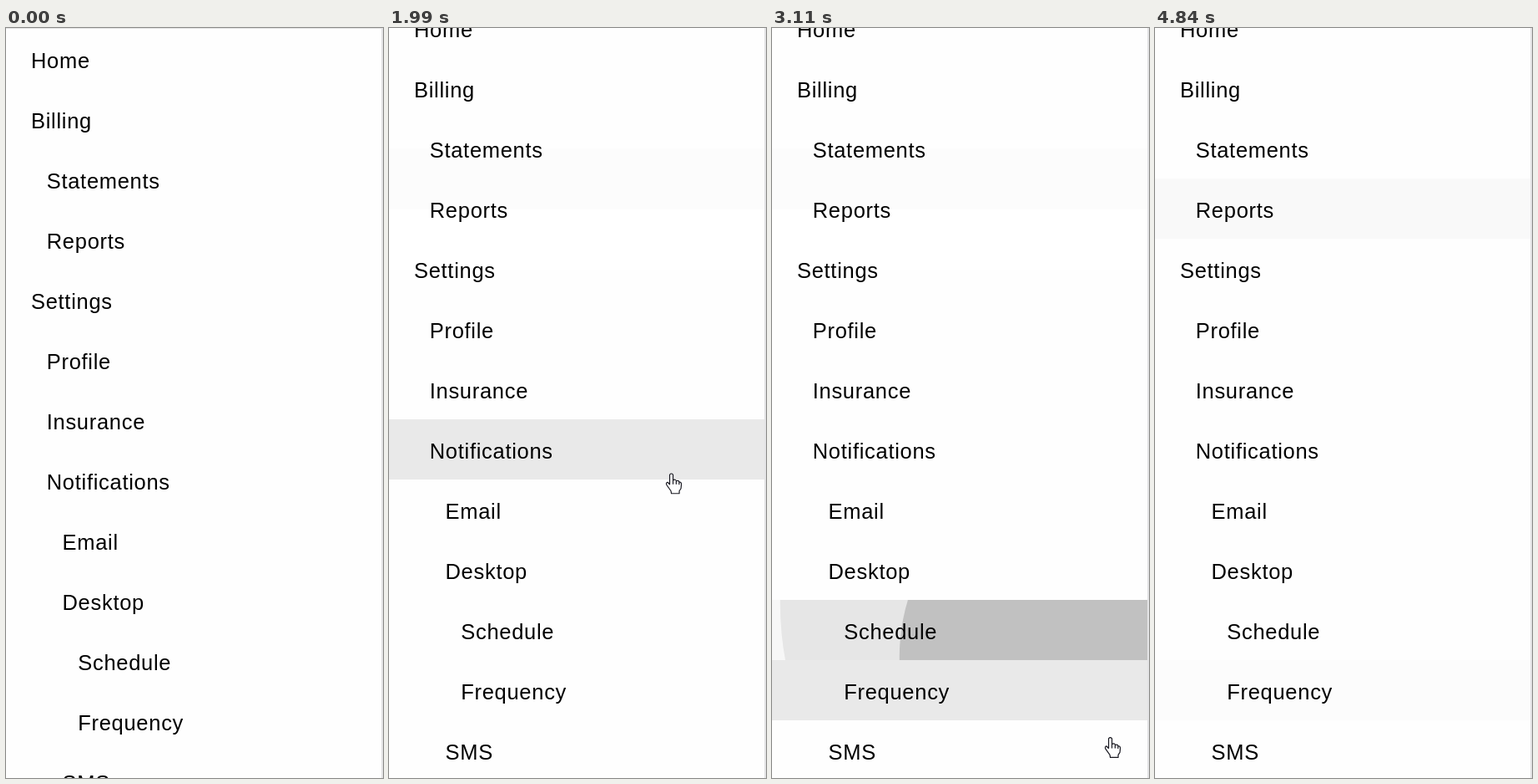
Animation of 452x897 px, one loop 4870 ms. Source, as an HTML page with a canvas:

```html
<!DOCTYPE html>
<html lang="en">
<head>
<meta charset="utf-8">
<title>Nested menu</title>
<style>
html, body { margin: 0; width: 100%; height: 100%; overflow: hidden; background: #fefefe; }
canvas { display: block; }
</style>
</head>
<body>
<canvas id="stage" width="452" height="897"></canvas>
<script>
const ctx = document.getElementById('stage').getContext('2d');
const LOOP = 4870, ROW = 72, MENU_W = 450;
const HOVER_LAG = 40, HOVER_FADE = 200, SETTLED = 3790;

// label, nesting depth
const items = [
  ['Home', 0], ['Billing', 0], ['Statements', 1], ['Reports', 1],
  ['Settings', 0], ['Profile', 1], ['Insurance', 1], ['Notifications', 1],
  ['Email', 2], ['Desktop', 2], ['Schedule', 3], ['Frequency', 3], ['SMS', 2]
];

// time, x, y of the pointer tip
const tracks = [
  [[150, 400, -20], [190, 398, 8], [400, 380, 130], [640, 372, 238], [690, 460, 245]],
  [[1490, 452, 470], [1640, 370, 505], [1990, 338, 532], [2550, 362, 676],
   [2780, 384, 690], [2930, 386, 751], [3110, 405, 848], [3290, 417, 840],
   [3340, 417, 821], [3670, 412, 98], [3720, 395, 58], [3760, 380, -30]]
];

const ripples = [
  { row: 10, x: 386, y: 688, start: 2780, size: 392 },
  { row: 10, x: 386, y: 752, start: 2990, size: 386 },
  { row: 12, x: 417, y: 840, start: 3298, size: 421 }
];
const presses = [[2740, 2800], [2890, 3000], [3240, 3310]];

const hand = new Path2D('M-2 13V1.5Q0-1 2 1.5V8Q5 6.5 6 9Q9 8 9.5 10.5Q12 10 12 13' +
  'L11.5 18L9.5 21V24H0L-.5 21L-5.5 14Q-7 11-4.5 10.5Z');
const knuckles = new Path2D('M2 8V13M5.8 9V13M9.3 10.5V13.5');

const clamp = v => Math.max(0, Math.min(1, v));

function pointer(t) {
  for (const track of tracks) {
    for (let i = 1; i < track.length; i++) {
      const [t0, x0, y0] = track[i - 1], [t1, x1, y1] = track[i];
      if (t >= t0 && t < t1) {
        const p = (t - t0) / (t1 - t0);
        return { x: x0 + (x1 - x0) * p, y: y0 + (y1 - y0) * p };
      }
    }
  }
  return null;
}

function scrollAt(t) {
  const p = clamp((t - 1490) / 260);
  return 37 * p * p * (3 - 2 * p);
}

function rowUnder(t) {
  const p = pointer(t);
  return p && p.x < MENU_W ? Math.floor((p.y + scrollAt(t) - 1) / ROW) : -1;
}

function hoverLevels(t) {
  const levels = {};
  for (let age = HOVER_FADE; age >= 0; age -= 5) {
    levels[rowUnder(t - HOVER_LAG - age)] = 1 - age / HOVER_FADE;
  }
  return levels;
}

// Fast start, long slow end: cubic-bezier(0, 0, .2, 1)
function decelerate(x) {
  let lo = 0, hi = 1;
  for (let i = 0; i < 20; i++) {
    const u = (lo + hi) / 2;
    if (0.6 * u * u + 0.4 * u * u * u < x) lo = u; else hi = u;
  }
  return lo * lo * (3 - 2 * lo);
}

function band(y, h, color) {
  ctx.fillStyle = color;
  ctx.fillRect(0, y, MENU_W, h);
}

function drawTints(t) {
  if (t >= SETTLED) {
    band(180, ROW, '#f9f9f9');
    band(756, ROW, '#fcfcfc');
  } else if (t >= 640) {
    band(144, 73, '#fcfcfc');
    band(217, ROW, t < 1490 ? '#fdfdfd' : '#fff');
  }
}

function drawRipple(r, t, scroll) {
  const age = t - r.start;
  if (age < 0 || age > 450) return;
  const alpha = 0.16 * clamp((430 - age) / 230);
  ctx.save();
  ctx.beginPath();
  ctx.rect(0, r.row * ROW + 1 - scroll, MENU_W, ROW);
  ctx.clip();
  ctx.fillStyle = `rgba(0,0,0,${alpha})`;
  ctx.beginPath();
  ctx.arc(r.x, r.y, r.size * decelerate(age / 450), 0, Math.PI * 2);
  ctx.fill();
  ctx.restore();
}

function drawPointer(t) {
  const p = pointer(t);
  if (!p) return;
  if (presses.some(([from, to]) => t >= from && t < to)) {
    ctx.fillStyle = 'rgba(246,240,30,.6)';
    ctx.beginPath();
    ctx.arc(p.x, p.y, 15, 0, Math.PI * 2);
    ctx.fill();
  }
  const pressed = presses.some(([from, to]) => t >= from && t < to);
  ctx.save();
  ctx.translate(p.x + 0.5, p.y + 0.5);
  ctx.fillStyle = pressed ? 'rgba(255,255,255,.45)' : '#fff';
  ctx.strokeStyle = '#181820';
  ctx.lineWidth = 1.2;
  ctx.lineJoin = 'round';
  ctx.fill(hand);
  ctx.stroke(hand);
  ctx.stroke(knuckles);
  ctx.restore();
}

function draw(t) {
  const scroll = scrollAt(t);
  ctx.fillStyle = '#fefefe';
  ctx.fillRect(0, 0, 452, 897);
  drawTints(t);

  if (t < SETTLED) {
    const levels = hoverLevels(t);
    items.forEach((_, i) => {
      if (levels[i]) band(i * ROW + 1 - scroll, ROW, `rgba(0,0,0,${0.083 * levels[i]})`);
    });
    ripples.forEach(r => drawRipple(r, t, scroll));
  }

  ctx.fillStyle = '#e4e4e4';
  ctx.fillRect(0, -scroll, MENU_W, 1);
  ctx.fillStyle = '#e4e4e6';
  ctx.fillRect(MENU_W, 0, 2, 897);

  ctx.fillStyle = '#000';
  ctx.font = '25.5px "Liberation Sans", Arial, sans-serif';
  ctx.letterSpacing = '0.7px';
  ctx.textBaseline = 'alphabetic';
  items.forEach(([label, depth], i) => {
    ctx.fillText(label, 30 + depth * 18.75, i * ROW + 48 - scroll);
  });

  drawPointer(t);
}

const begin = performance.now();
function tick() {
  draw((performance.now() - begin) % LOOP);
  requestAnimationFrame(tick);
}
tick();
</script>
</body>
</html>
```
